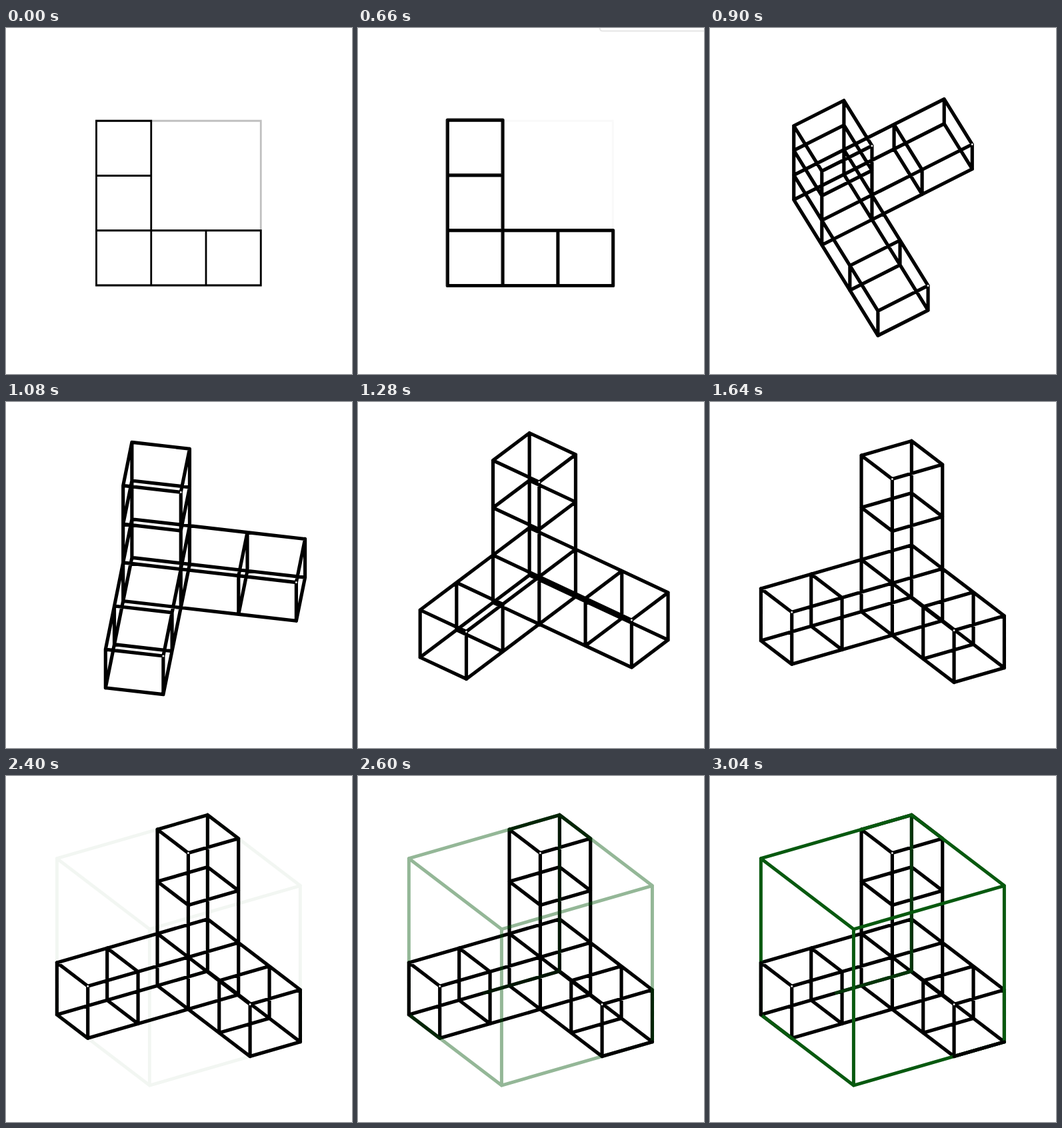
Write an HTML page that moves like this. It is 519x519 px and loops after 3.06 s.

```html
<!DOCTYPE html>
<html lang="en">
<head>
<meta charset="utf-8">
<title>Cube corner</title>
<style>
  html, body { margin: 0; width: 100%; height: 100%; overflow: hidden; background: #fff; }
  svg { display: block; width: 100vw; height: 100vh; }
  path { fill: none; stroke: #000; stroke-linecap: round; stroke-linejoin: round; }
  #plan path { stroke-linejoin: miter; stroke-width: 2.8; }
  #wire, #kept { stroke-width: 5.2; }
  #frame path { stroke: #07590f; stroke-width: 5; }
  #frame #kept { stroke: #000; }
</style>
</head>
<body>
<svg viewBox="0 0 519 519">
  <g id="plan">
    <path id="square" style="stroke:#c0c0c0"/>
    <path id="cells"/>
  </g>
  <g id="solid">
    <rect width="519" height="519" fill="#fff"/>
    <path id="panel" d="M521 4.5H367Q362.5 4.5 362.5 -1" style="stroke:#e4e4e4;stroke-width:2"/>
    <path id="wire"/>
    <g id="frame">
      <path id="inner" opacity=".6"/>
      <path id="outer"/>
      <path id="kept"/>
    </g>
    <path id="dots" style="stroke:#eee;stroke-width:3"/>
  </g>
</svg>
<script>
const LOOP = 3060, STEP = 20, SIDE = 3;
const el = id => document.getElementById(id);
const set = (id, name, value) => el(id).setAttribute(name, value);
const ramp = (t, from, length) => Math.min(1, Math.max(0, (t - from) / length));

// A point or cube n units out along one axis, with the other coordinates at rest.
const along = (axis, n, rest = 0) => [0, 1, 2].map(i => i === axis ? n : rest);

const axes = [0, 1, 2];
const cubes = [along(0, 0), ...axes.flatMap(a => [along(a, 1), along(a, 2)])];

function cubeEdges([x, y, z], size = 1) {
  const list = [];
  for (const a of [0, size]) for (const b of [0, size]) {
    list.push([[x, y + a, z + b], [x + size, y + a, z + b]]);
    list.push([[x + a, y, z + b], [x + a, y + size, z + b]]);
    list.push([[x + a, y + b, z], [x + a, y + b, z + size]]);
  }
  return list;
}

const isOrigin = point => point.every(v => v === 0);
const wireEdges = cubes.flatMap(c => cubeEdges(c));
const outerEdges = cubeEdges([0, 0, 0], SIDE).filter(([a]) => !isOrigin(a));
const innerEdges = [[along(0, 0), along(0, SIDE / 2)], [along(0, 0), along(2, SIDE)]];
// Arm edges that stay black inside the big frame.
const keptEdges = [[[SIDE, 0, 0], [SIDE, 0, 1]], [[0, SIDE, 0], [1, SIDE, 0]]];
const armTips = axes.map(a => along(a, SIDE, 1));

// Turntable view: azimuth, tilt, zoom and drift share one progress value p.
function camera(p) {
  const rad = Math.PI / 180;
  const turn = 148.4 * p * rad, tilt = (90 - 62 * p) * rad;
  const scale = 88.45 - 5.65 * (1 - p) ** 1.7;
  const cx = 242.3 + 8 * p ** 3 * (1 - p);
  const cy = 318.2 - 52.3 * p + 123.9 * p ** 2 - 39.5 * p ** 3;
  const c = Math.cos(turn), s = Math.sin(turn);
  return ([x, y, z]) => {
    const dx = x - 1.305, dy = y - 0.825;
    const px = cx + scale * (dx * c + dy * s);
    const py = cy + scale * ((dx * s - dy * c) * Math.sin(tilt) - z * Math.cos(tilt));
    return px.toFixed(2) + " " + py.toFixed(2);
  };
}

const pathOf = (edges, view) => edges.map(([a, b]) => `M${view(a)}L${view(b)}`).join("");

function drawPlan() {
  const unit = 82.25;
  const square = (x, y, n) => `M${135.5 + x * unit} ${386 - y * unit}h${n * unit}v${-n * unit}h${-n * unit}z`;
  set("square", "d", square(0, 0, SIDE));
  set("cells", "d", cubes.filter(c => c[2] === 0).map(([x, y]) => square(x, y, 1)).join(""));
}

function draw(t) {
  const fade = t < 460 ? 0 : ramp(t, 440, 240);
  const p = 1 - (1 - ramp(t, 680, 950)) ** 2;
  const box = t < 2400 ? 0 : ramp(t, 2375, 525);
  const view = camera(p);
  const tips = p > 0.1 ? armTips : [];

  set("solid", "opacity", fade);
  set("panel", "opacity", t < 700 ? 1 : 0);
  set("frame", "opacity", box);
  set("wire", "d", pathOf(wireEdges, view));
  set("outer", "d", pathOf(outerEdges, view));
  set("inner", "d", pathOf(innerEdges, view));
  set("kept", "d", pathOf(keptEdges, view));
  set("dots", "d", tips.map(v => `M${view(v)}h.01`).join(""));
}

drawPlan();
const start = performance.now();
function tick() {
  const t = (performance.now() - start) % LOOP;
  draw(Math.floor(t / STEP) * STEP);
  requestAnimationFrame(tick);
}
tick();
</script>
</body>
</html>
```
